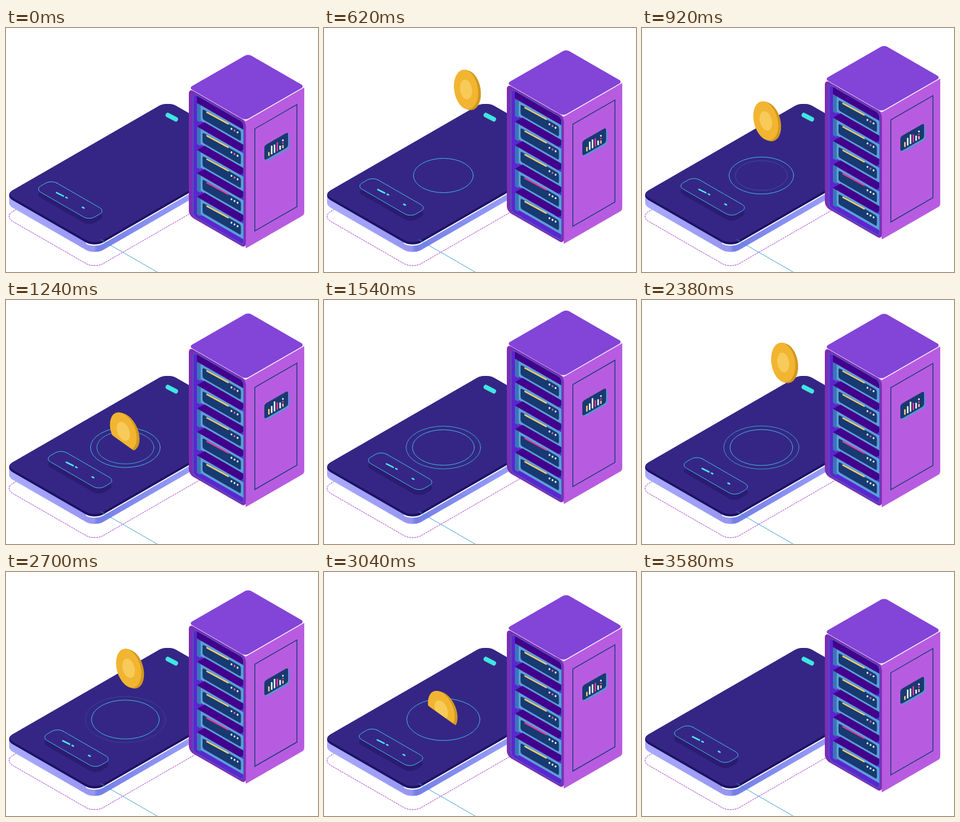
Recreate the animation shown at these times as an HTML page with a canvas. Size 500 by 392 pixels, loop 3600 ms.

```html
<!DOCTYPE html>
<html lang="en">
<head>
<meta charset="utf-8">
<title>Server and phone</title>
<style>
  html, body { margin: 0; width: 100%; height: 100%; overflow: hidden; background: #fff; }
  canvas { display: block; }
</style>
</head>
<body>
<canvas id="stage" width="500" height="392"></canvas>
<script>
const ctx = document.getElementById('stage').getContext('2d');
const LOOP = 3600;
const TAU = 2 * Math.PI;
const C = Math.cos(Math.PI / 6);

// Axes of the three isometric planes
const FLOOR = [C, .5, -C, .5];
const FRONT = [C, .5, 0, 1];
const SIDE = [C, -.5, 0, 1];

// Rounded rectangle lying in a plane, with its first corner at x, y
function trace(plane, x, y, w, h, r = 0) {
  ctx.save();
  ctx.transform(...plane, x, y);
  ctx.beginPath();
  ctx.roundRect(0, 0, w, h, r);
  ctx.restore();
}

function fill(color, ...rect) {
  trace(...rect);
  ctx.fillStyle = color;
  ctx.fill();
}

function outline(color, width, ...rect) {
  trace(...rect);
  ctx.strokeStyle = color;
  ctx.lineWidth = width;
  ctx.stroke();
}

function line(color, width, x, y, dx, dy, cap = 'round') {
  ctx.beginPath();
  ctx.moveTo(x, y);
  ctx.lineTo(x + dx, y + dy);
  ctx.strokeStyle = color;
  ctx.lineWidth = width;
  ctx.lineCap = cap;
  ctx.stroke();
}

function ellipse(color, x, y, rx, ry) {
  ctx.beginPath();
  ctx.ellipse(x, y, rx, ry, 0, 0, TAU);
  ctx.fillStyle = color;
  ctx.fill();
}

function at(dx, dy, draw) {
  ctx.save();
  ctx.translate(dx, dy);
  draw();
  ctx.restore();
}

const phone = [FLOOR, 259, 117.3, 167.6, 302.7, 16];
const bodyColor = ctx.createLinearGradient(5, 0, 300, 0);
bodyColor.addColorStop(0, '#aaaaff');
bodyColor.addColorStop(.46, '#9696f2');
bodyColor.addColorStop(.48, '#747fe6');
bodyColor.addColorStop(1, '#989dfa');

function drawPhone() {
  ctx.setLineDash([2, 2]);
  at(0, 34, () => outline('#a53bd8', 1, ...phone));
  ctx.setLineDash([]);
  for (let d = 12; d > 0; d -= 2) at(0, d, () => fill(bodyColor, ...phone));

  ctx.save();
  ctx.beginPath();
  ctx.rect(128, 200, 200, 180);
  ctx.clip();
  at(0, 2, () => fill('#fff', ...phone));
  ctx.restore();

  fill('#1d1163', ...phone);
  ctx.save();
  trace(...phone);
  ctx.clip();
  at(0, -4, () => fill('#352685', ...phone));
  ctx.restore();
  line('#3a9fcb', .9, 152, 340, 150, 150 * .577);
  line('#3fe6e2', 7.5, 259.5, 140, 12.5, 6.5);
}

function drawRings(t) {
  for (let i = 0; i < 3; i++) {
    const age = t - i * 790;
    if (age <= 0 || age >= 2000) continue;
    const r = 40 + age * .0128;
    ctx.globalAlpha = Math.min(1, 1.3 * Math.sin(Math.PI * age / 2000));
    ctx.beginPath();
    ctx.ellipse(191.3, 237, r, r * .575, 0, 0, TAU);
    ctx.strokeStyle = '#3fb6d6';
    ctx.lineWidth = 1;
    ctx.stroke();
  }
  ctx.globalAlpha = 1;
}

function drawCard() {
  const card = [FLOOR, 72.7, 243, 99.7, 29.8, 10];
  at(0, 9, () => fill('#2b1b73', ...card));
  fill('#352685', ...card);
  outline('#43b9d8', 1, ...card);
  line('#4ae9ee', 2.4, 81, 263.5, 11, 5.5);
  line('#4ae9ee', 2.4, 96, 271, 2, 1);
  line('#4ae9ee', 2.4, 122.5, 287, 2.5, 1.3);
}

// Leaps out behind the server, glides left and sinks into the phone; s is its age
function drawCoin(s) {
  if (s < 0 || s > 1600) return;
  const x = 188 + 162 * Math.max(0, 1 - s / 1250) ** 2.2;
  const y = 34 + 185 * (s / 1250) ** 1.4 + 66 * Math.exp(-s / 40);
  const tilt = -(16 + 7 * Math.cos(TAU * s / 1250)) * Math.PI / 180;
  const disc = (color, shift, scale = 1) => at(x + shift, y + shift * .3, () => {
    ctx.rotate(tilt);
    ellipse(color, 0, 0, 19 * scale, 32 * scale);
  });
  ctx.save();
  ctx.beginPath();
  ctx.moveTo(0, 95);
  ctx.lineTo(500, 453);
  ctx.lineTo(500, 0);
  ctx.lineTo(0, 0);
  ctx.clip();
  for (let shift = 4.5; shift > 0; shift--) disc('#d3981f', shift);
  disc('#f1b531', 0);
  disc('#f8ca59', 0, .5);
  ctx.restore();
}

function drawUnit(i) {
  at(0, i * 37.7, () => {
    fill('#42008c', FLOOR, 318, 113.6, 80, 14);
    fill('#3a76b8', FRONT, 306, 120.5, 7, 28);
    fill('#5c9fd8', FRONT, 312, 124, 80, 25);
    fill('#173a72', FRONT, 315, 130, 71, 16.5, 3);
    line(i === 3 ? '#f0389c' : '#ffd064', 2.2, 322, 135.5, 34, 18.5);
    for (let k = 0; k < 3; k++) {
      ellipse(k === 1 && i < 3 ? '#f45aac' : '#fff', 361.3 + k * 4.9, 162 + k * 2.8, 1.4, 1.7);
    }
  });
}

function drawChart(swing) {
  fill('#5598d6', SIDE, 416, 191, 44, 24, 4);
  fill('#183a70', SIDE, 414, 189, 44, 24, 4);
  const colors = ['#ffd27a', '#fff', '#fff', '#f0389c', '#fff', '#ffc078'];
  colors.forEach((color, i) => {
    const sway = swing * (i % 2 ? 1.8 : -1.8);
    const height = i < 5 ? 11 + 4 * Math.sin(1.2 * i - .9) + sway : 5;
    line(color, 2.3, 421.3 + i * 4.5, 205.5 - i * 2.5, 0, -height, 'butt');
  });
  ellipse('#f0389c', 443.8, 185, 1.3, 1.4);
  ellipse('#fff', 443.8, 180.5, 1.3, 1.4);
}

function drawServer(swing) {
  fill('#b75ce0', FRONT, 372, 142.6, 14.4, 195);
  fill('#b75ce0', SIDE, 384, 149.8, 108.5, 204.5, [0, 0, 4, 2]);
  fill('#7b2eb4', FRONT, 293, 97, 105.5, 204.5, 8);
  fill('#8344d8', FLOOR, 388, 41.5, 104.5, 109.7, 6);

  const bay = [FRONT, 300, 105, 93.3, 197, 6];
  fill('#5b26cf', ...bay);
  ctx.save();
  trace(...bay);
  ctx.clip();
  fill('#42008c', FRONT, 306, 108, 90, 13);
  for (let i = 0; i < 5; i++) drawUnit(i);
  ctx.restore();
  outline('#3d6cc4', 1, ...bay);

  outline('#1f3c7c', 1.4, SIDE, 398.7, 162, 78, 164);
  drawChart(swing);
}

function render() {
  const t = performance.now() % LOOP;
  const angle = TAU * t / LOOP;
  const swing = Math.cos(angle);
  ctx.fillStyle = '#fff';
  ctx.fillRect(0, 0, 500, 392);
  drawPhone();
  drawRings(t);
  at(10 * (1 - swing), 1.7 - 6 * Math.sin(angle + .12), drawCard);
  drawCoin(t - 30);
  drawCoin(t - 1780);
  at(0, 13.8 * (swing - 1), () => drawServer(swing));
  requestAnimationFrame(render);
}
render();
</script>
</body>
</html>
```
